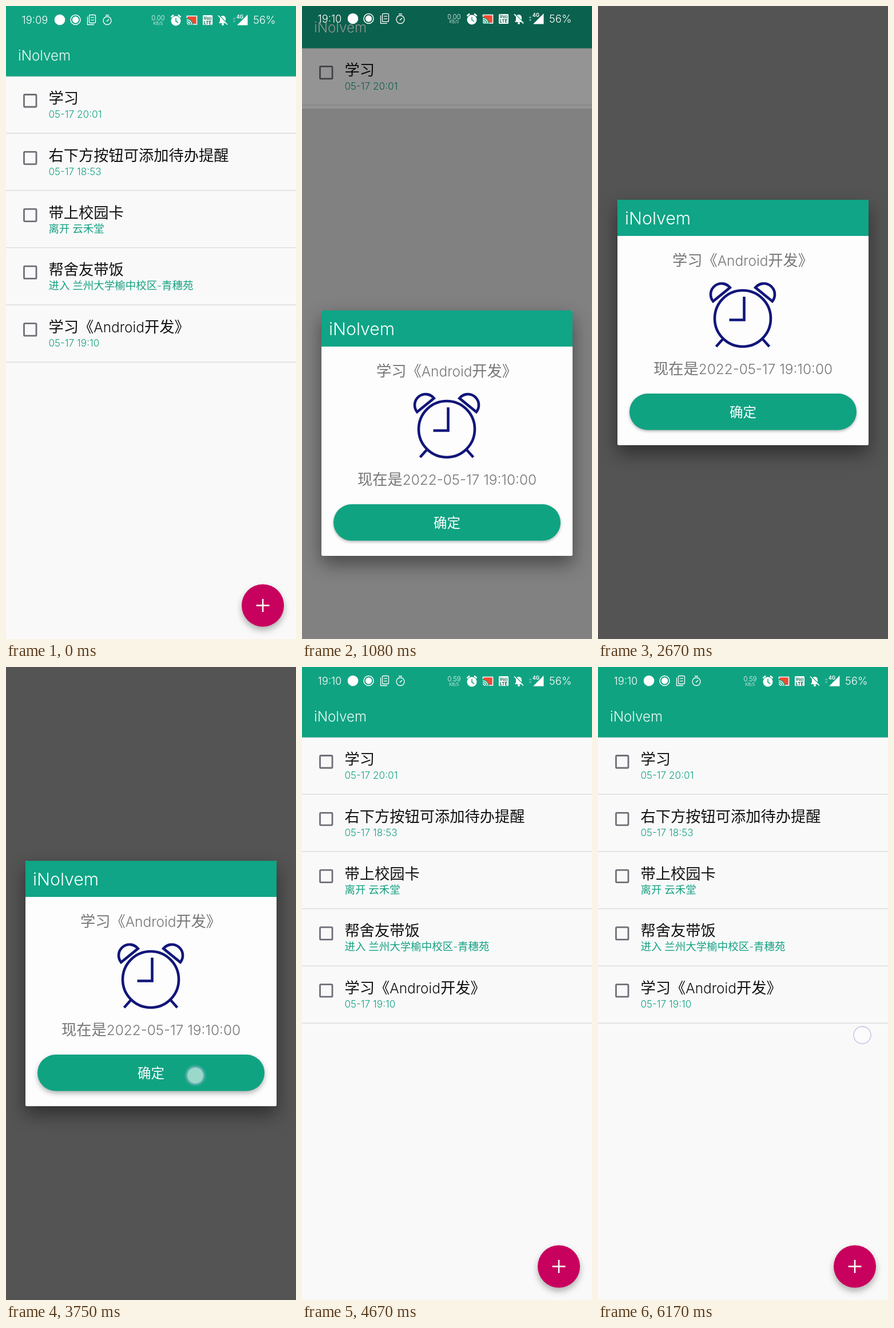
An HTML page with a canvas that plays this animation: 507 px wide and 1104 px high, repeating every 6.26 s.

```html
<!DOCTYPE html>
<html lang="zh-CN">
<head>
<meta charset="utf-8">
<title>Reminder list</title>
<style>
html, body { margin: 0; width: 100%; height: 100%; overflow: hidden; background: #f9f9f9; }
canvas { display: block; width: 507px; height: 1104px; }
</style>
</head>
<body>
<canvas id="stage" width="507" height="1104"></canvas>
<script>
const W = 507, H = 1104, LOOP = 6260;
const c = document.getElementById('stage').getContext('2d');
const LATIN = 'Inter, Roboto, sans-serif';
const HAN = '"Noto Sans CJK SC", "Noto Sans CJK", sans-serif';
const GREEN = '#10a382', PINK = '#c8005e', NAVY = '#11167a', BACK = '#dadada';
const APP = 'iNolvem';
const ROWS = [
  ['学习', '05-17 20:01'],
  ['右下方按钮可添加待办提醒', '05-17 18:53'],
  ['带上校园卡', '离开 云禾堂'],
  ['帮舍友带饭', '进入 兰州大学榆中校区-青穗苑'],
  ['学习《Android开发》', '05-17 19:10']
];

// Timeline in ms
const T = {
  minute: 670, open: 850, hideBar: 962,
  press: 3670, close: 3793.5, showBar: 3830, lastTouch: 6130
};
const SLIDE = 425, BAR = 340;

const clamp = x => Math.max(0, Math.min(1, x));
const span = (t, start, length) => clamp((t - start) / length);

// cubic-bezier(.4, 0, .2, 1)
function ease(x) {
  let lo = 0, hi = 1;
  for (let i = 0; i < 20; i++) {
    const s = (lo + hi) / 2, r = 1 - s;
    if (1.2 * r * r * s + 0.6 * r * s * s + s * s * s < x) lo = s; else hi = s;
  }
  return lo * lo * (3 - 2 * lo);
}

function rect(x, y, w, h, color) {
  c.fillStyle = color;
  c.fillRect(x, y, w, h);
}

// Latin runs are set slightly smaller than the Han runs beside them
function text(s, x, y, size, color, weight = 350, align = 'left') {
  const runs = s.match(/[\x20-\x7e]+|[^\x20-\x7e]+/g).map(run => {
    const font = run < '\x7f' ? `${weight} ${size * 0.93}px ${LATIN}` : `300 ${size}px ${HAN}`;
    c.font = font;
    return { run, font, width: c.measureText(run).width };
  });
  if (align === 'center') x -= runs.reduce((sum, r) => sum + r.width, 0) / 2;
  c.fillStyle = color;
  for (const { run, font, width } of runs) {
    c.font = font;
    c.fillText(run, x, y);
    x += width;
  }
}

function disc(x, y, r, color) {
  c.beginPath();
  c.arc(x, y, r, 0, Math.PI * 2);
  c.fillStyle = color;
  c.fill();
}

function ring(x, y, r, color, width) {
  c.beginPath();
  c.arc(x, y, r, 0, Math.PI * 2);
  c.strokeStyle = color;
  c.lineWidth = width;
  c.stroke();
}

function line(color, width, ...pts) {
  c.beginPath();
  for (let i = 0; i < pts.length; i += 2) c.lineTo(pts[i], pts[i + 1]);
  c.strokeStyle = color;
  c.lineWidth = width;
  c.stroke();
}

function shape(color, ...pts) {
  c.beginPath();
  for (let i = 0; i < pts.length; i += 2) c.lineTo(pts[i], pts[i + 1]);
  c.closePath();
  c.fillStyle = color;
  c.fill();
}

function round(x, y, w, h, r, color) {
  c.beginPath();
  c.roundRect(x, y, w, h, r);
  c.fillStyle = color;
  c.fill();
}

function shadowed(dy, blur, alpha, draw) {
  c.save();
  c.shadowColor = `rgba(0,0,0,${alpha})`;
  c.shadowOffsetY = dy;
  c.shadowBlur = blur;
  draw();
  c.restore();
}

function drawList(barFade) {
  rect(0, 0, W, H, '#f9f9f9');
  shadowed(0.5, 2, 0.2, () => rect(0, 0, W, 122.7, GREEN));
  if (barFade > 0) rect(0, 0, W, 48.5, `rgba(218,218,218,${barFade})`);
  text(APP, 21, 95, 26, '#eefaf5');
  ROWS.forEach(([title, note], i) => {
    const y = i * 99.8;
    c.strokeStyle = '#706e77';
    c.lineWidth = 2.8;
    c.beginPath();
    c.roundRect(31.5, 154.5 + y, 21.5, 21.5, 1.5);
    c.stroke();
    text(title, 74.5, 170 + y, 26.25, '#111');
    text(note, 74.5, 195 + y, 18.5, '#14a183');
    rect(0, 221.3 + y, W, 1.3, '#dadada');
  });
  shadowed(6, 12, 0.3, () => disc(449, 1045.5, 37, PINK));
  line('#fff', 2.6, 437.5, 1045.5, 460.5, 1045.5);
  line('#fff', 2.6, 449, 1034, 449, 1057);
}

function drawAlarmClock() {
  ring(253, 545, 49, NAVY, 4.6);
  line(NAVY, 4.6, 255.5, 507, 255.5, 547.5, 229.5, 547.5);
  for (const side of [-1, 1]) {
    c.save();
    c.translate(253, 0);
    c.scale(side, 1);
    line(NAVY, 4.6, 34, 580, 46.5, 594);
    c.translate(37, 503);
    c.rotate(0.68);
    c.beginPath();
    c.arc(0, 0, 19, Math.PI, 0);
    c.closePath();
    c.stroke();
    c.restore();
  }
}

function drawDialog(pressed) {
  shadowed(14, 32, 0.45, () => round(34, 338, 439, 428, 2.5, '#fdfdfd'));
  round(34, 338, 439, 63, [2.5, 2.5, 0, 0], '#0fa586');
  text(APP, 47, 381, 32.5, '#fff');
  text('学习《Android开发》', 253, 453, 26.25, '#777', 350, 'center');
  drawAlarmClock();
  text('现在是2022-05-17 19:10:00', 253.5, 642, 26.25, '#777', 350, 'center');
  shadowed(pressed ? 4 : 2, pressed ? 9 : 5, 0.3,
    () => round(55, 676, 397, 63.5, 31.75, GREEN));
  text('确定', 253.5, 717, 23.5, '#fff', 350, 'center');
}

function drawNotices(x) {
  const w = '#fff';
  disc(x, 24, 9.3, w);
  ring(x + 27.5, 24, 8.5, w, 1.5);
  disc(x + 27.5, 24, 5.7, w);

  // Copied pages
  c.strokeStyle = w;
  c.lineWidth = 1.3;
  c.beginPath();
  c.roundRect(x + 51.5, 15.5, 11, 14, 2);
  c.stroke();
  line(w, 1.3, x + 48.5, 18.5, x + 48.5, 32.5, x + 60, 32.5);
  line(w, 1.2, x + 54, 20, x + 60, 20);
  line(w, 1.2, x + 54, 24.5, x + 60, 24.5);

  // Stopwatch
  ring(x + 83, 25.5, 7, w, 1.4);
  line(w, 1.5, x + 80, 16, x + 86, 16);
  line(w, 1.6, x + 82, 27, x + 86, 23);
}

function drawSystemIcons(speed) {
  const w = '#fff';
  text(speed, 266, 25, 12, w, 350, 'center');
  text('KB/S', 266, 32.5, 8, w, 350, 'center');

  // Alarm
  disc(297, 26, 8.5, w);
  line(w, 2.6, 288.5, 19.5, 293, 15.5);
  line(w, 2.6, 301, 15.5, 305.5, 19.5);
  line(GREEN, 1.5, 297, 21, 297, 26.5, 301, 29);

  // Cast
  rect(317, 18, 17, 14, '#f04a32');
  line(w, 1.6, 316.5, 21, 316.5, 17.5, 333.5, 17.5, 333.5, 32, 326, 32);
  c.beginPath();
  c.moveTo(316, 22);
  c.arc(316, 33, 11, -Math.PI / 2, 0);
  c.lineTo(316, 33);
  c.fillStyle = GREEN;
  c.fill();
  for (const r of [3, 6, 9]) {
    c.beginPath();
    c.arc(316, 33, r, -Math.PI / 2, 0);
    c.strokeStyle = w;
    c.lineWidth = 1.4;
    c.stroke();
  }

  // Voice over LTE
  round(344, 16, 17, 17, 1.5, w);
  text('Vo))', 352.5, 23.5, 7.5, '#0b6a54', 700, 'center');
  text('LTE', 352.5, 31.5, 8.5, '#0b6a54', 700, 'center');

  // Muted bell
  c.beginPath();
  c.moveTo(372, 30);
  c.lineTo(374, 27);
  c.lineTo(374, 22);
  c.arc(379, 22, 5, Math.PI, 0);
  c.lineTo(384, 27);
  c.lineTo(386, 30);
  c.closePath();
  c.fillStyle = w;
  c.fill();
  disc(379, 32, 2, w);
  line(GREEN, 1.6, 372.5, 16, 388, 31.5);
  line(w, 1.7, 371, 16.5, 387, 32.5);

  // Signal
  shape('#72c7b3', 396.5, 23, 399, 20, 401.5, 23);
  shape('#72c7b3', 396.5, 25.5, 399, 28.5, 401.5, 25.5);
  shape(w, 404, 33.5, 422.5, 33.5, 422.5, 15);
  text('4G', 403, 21.5, 9, w, 700);
  text('56%', 432, 31.3, 20, w);
}

function drawStatus(t, y) {
  const late = t >= T.minute;
  c.save();
  c.translate(0, y);
  text(late ? '19:10' : '19:09', 27.5, 31.3, 19.7, '#fff');
  drawNotices(late ? 89 : 94);
  drawSystemIcons(t < T.close ? '0.00' : '0.59');
  c.restore();
}

function drawTouch(x, y, alpha) {
  if (alpha <= 0) return;
  c.save();
  c.globalAlpha = alpha;
  const glow = c.createRadialGradient(x, y, 12, x, y, 20);
  glow.addColorStop(0, 'rgba(255,255,255,.3)');
  glow.addColorStop(1, 'rgba(255,255,255,0)');
  disc(x, y, 20, glow);
  disc(x, y, 14, 'rgba(255,255,255,.4)');
  ring(x, y, 15, 'rgba(165,160,215,.5)', 1.8);
  c.restore();
}

// List window with its lower part cut off at a screen height
function listWindow(shift, cut, barFade) {
  c.save();
  c.beginPath();
  c.rect(0, 0, W, cut);
  c.clip();
  c.translate(0, shift);
  drawList(barFade);
  c.restore();
}

function render(t) {
  const closing = t >= T.close;
  const enter = ease(span(t, T.open, SLIDE));
  const back = ease(span(t, T.close, SLIDE));
  const leave = 1 - span(t, T.close, 100);
  const barIn = Math.pow(1 - span(t, T.showBar, BAR), 3);
  const barOut = Math.pow(span(t, T.hideBar, BAR), 3);

  rect(0, 0, W, H, BACK);
  if (closing) listWindow(0, H * back, barIn);
  else if (enter < 1) listWindow(-59.5 * enter, H * (1 - enter) * (1 - 0.088 * enter), 0);

  const dim = 0.61 * (closing ? leave : span(t, T.open, 345));
  if (dim > 0) rect(0, 0, W, H, `rgba(0,0,0,${dim})`);

  if (enter > 0 && leave > 0) {
    c.save();
    c.globalAlpha = leave;
    c.translate(0, H * (1 - enter));
    drawDialog(t >= T.press);
    c.restore();
  }

  const barY = -48 * (closing ? barIn : barOut);
  if (barY > -47.9) drawStatus(t, barY);

  if (t >= T.press) drawTouch(331, 712.5, 1 - span(t, 3830, 100));
  if (t >= T.lastTouch) drawTouch(462, 642, 1);
}

function tick() {
  render(performance.now() % LOOP);
  requestAnimationFrame(tick);
}
tick();
</script>
</body>
</html>
```
